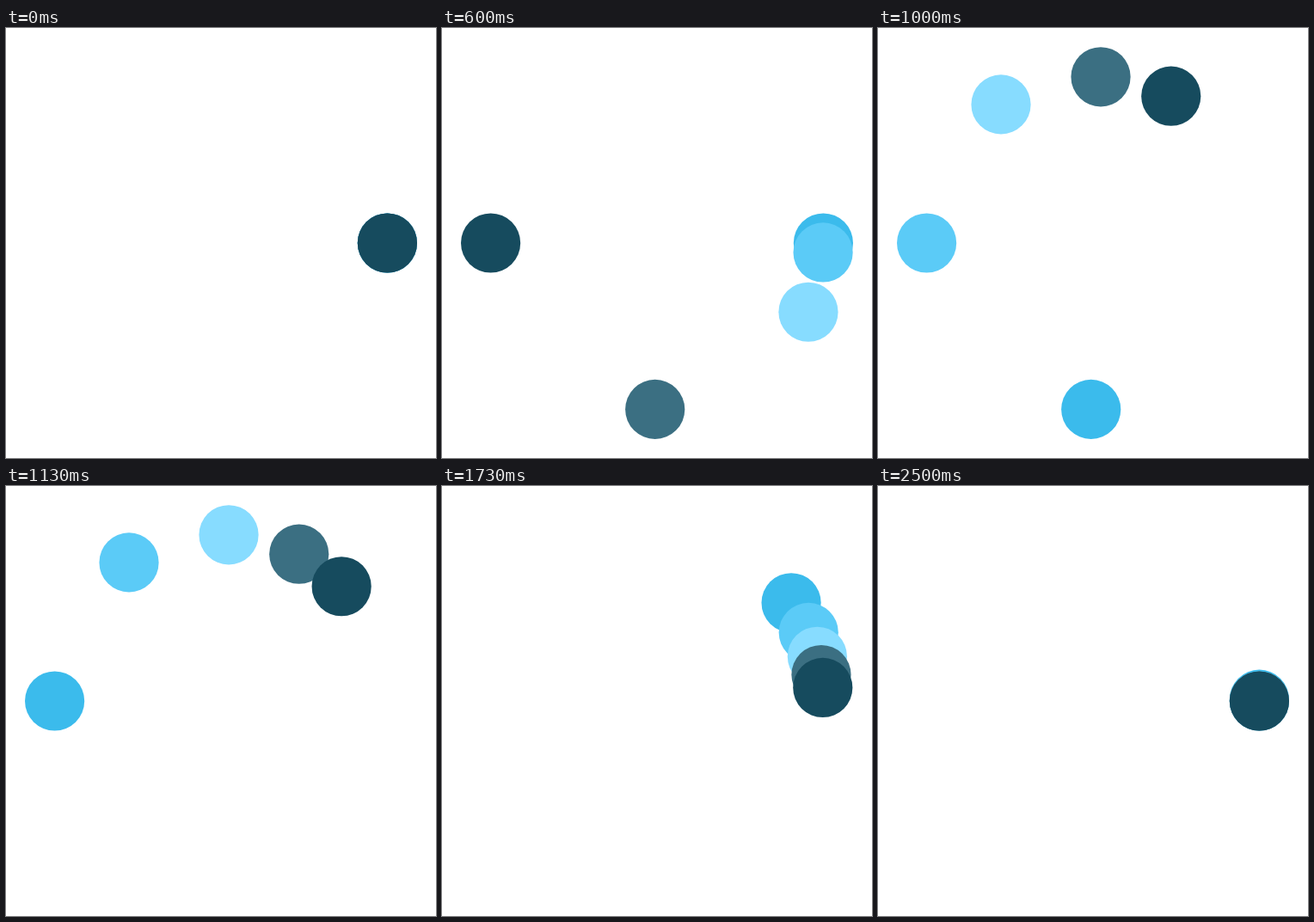
Write an HTML page that moves like this. It is 500 px wide and 500 px high and loops after 2530 ms.

```html
<!DOCTYPE html>
<html lang="en">
<head>
<meta charset="utf-8">
<title>Orbit loader</title>
<style>
html, body { margin: 0; width: 100%; height: 100%; overflow: hidden; background: #fff; }
svg { display: block; width: 100%; height: 100%; }
</style>
</head>
<body>
<svg viewBox="0 0 500 500">
  <circle r="34.6" fill="#3bbbec"/>
  <circle r="34.6" fill="#5bcbf7"/>
  <circle r="34.6" fill="#87dcff"/>
  <circle r="34.6" fill="#3b6f82"/>
  <circle r="34.6" fill="#164b5e"/>
</svg>
<script>
const LOOP = 2530, ORBIT = 193.4;
const START = 3, STAGGER = 4, SPAN = 60; // in steps of 1/30 s
const balls = [...document.querySelectorAll('circle')].reverse();

// cubic-bezier(1/3, 0, 0, 1), solved by bisection
function ease(x) {
  if (x <= 0) return 0;
  if (x >= 1) return 1;
  let lo = 0, hi = 1;
  for (let i = 0; i < 30; i++) {
    const s = (lo + hi) / 2;
    if (s * (1 - s) ** 2 + s ** 3 < x) lo = s; else hi = s;
  }
  return lo * lo * (3 - 2 * lo);
}

// 30 steps per second on a 10 ms clock; every 20th step holds the one before
function stepAt(ms) {
  const n = Math.floor((Math.floor(ms / 10) * 10 + 5) * 0.03);
  return n && n % 20 === 0 ? n - 1 : n;
}

function draw(ms) {
  const step = stepAt(ms % LOOP);
  balls.forEach((ball, i) => {
    const a = 2 * Math.PI * ease((step - START - i * STAGGER) / SPAN);
    ball.setAttribute('cx', 250 + ORBIT * Math.cos(a));
    ball.setAttribute('cy', 250 + ORBIT * Math.sin(a));
  });
}

const t0 = performance.now();
function tick() {
  draw(performance.now() - t0);
  requestAnimationFrame(tick);
}
tick();
</script>
</body>
</html>
```
